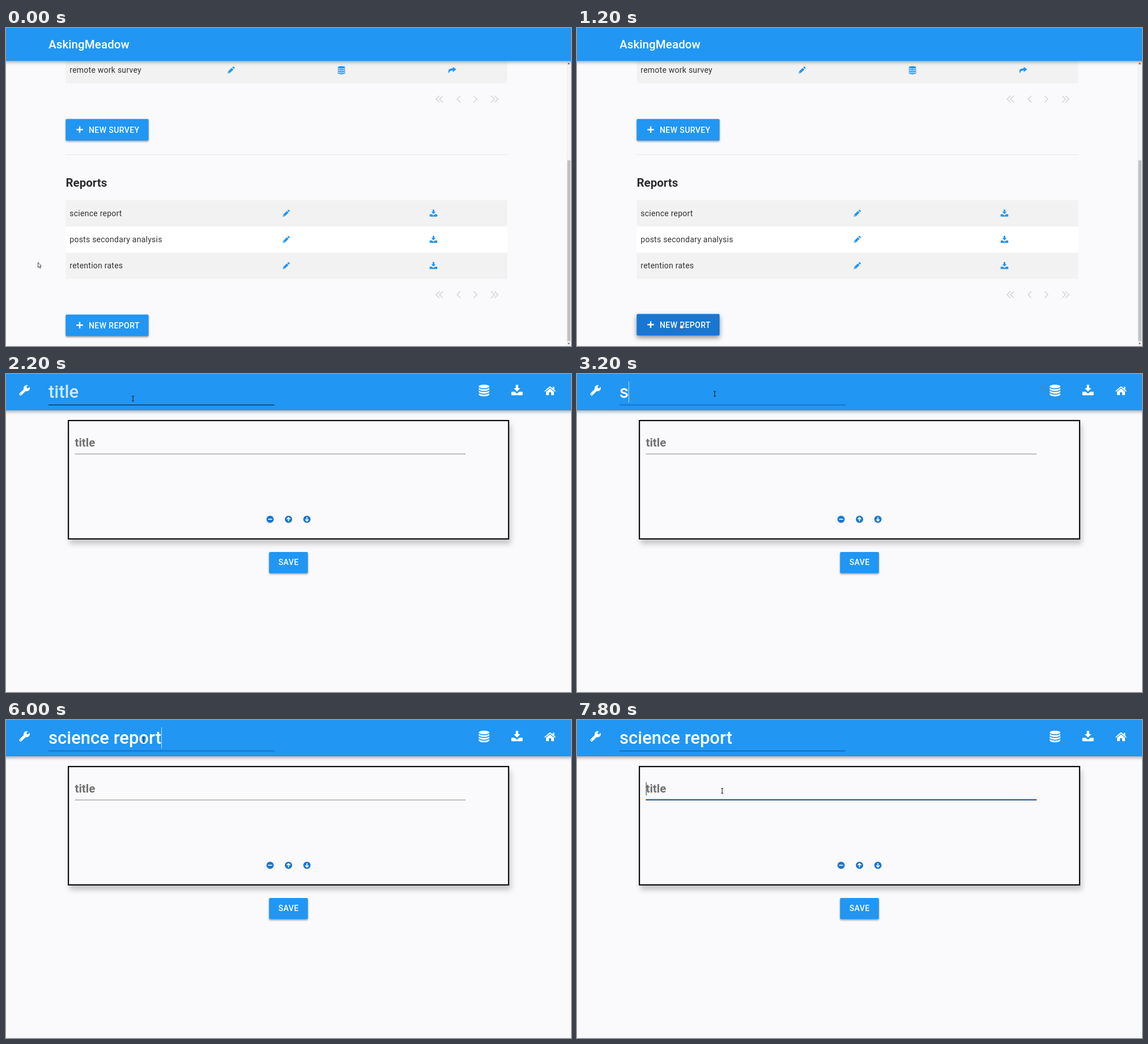
An HTML page for the animation above (8000 ms loop, 997x561 px).

```html
<!DOCTYPE html>
<html lang="en">
<head>
<meta charset="utf-8">
<title>Report builder</title>
<style>
html, body { margin: 0; width: 100%; height: 100%; overflow: hidden; background: #faf9fc; }
svg { display: block; width: 100vw; height: 100vh; }
text { font-family: Roboto, sans-serif; white-space: pre; }
.row { font-size: 14px; letter-spacing: .25px; fill: #333; }
.btn { font-size: 14px; font-weight: 500; letter-spacing: .4px; fill: #fff; }
.head { font-size: 20.5px; font-weight: 700; }
.field { font-size: 31px; font-weight: 500; }
.bar { fill: #2196f3; filter: drop-shadow(0 2px 3px rgba(0,0,0,.38)); }
.raised { filter: drop-shadow(0 2px 1.5px rgba(0,0,0,.36)); }
.lifted { filter: drop-shadow(0 4px 4px rgba(0,0,0,.42)); }
.card { fill: #faf9fc; stroke: #0b0b0f; stroke-width: 2.2; filter: drop-shadow(3px 8px 5px rgba(0,0,0,.2)); }
</style>
</head>
<body>
<svg id="stage" viewBox="0 0 997 561" preserveAspectRatio="none"></svg>
<script>
const LOOP = 8000, STEP = 200;
const BLUE = '#2196f3', DEEP = '#1976d2';
const stage = document.getElementById('stage');
const $ = id => document.getElementById(id);

// Icons live in a 16 x 16 box
const band = y => `M1 ${y}q2 2 7 2t7-2v2q-2 2.2-7 2.2t-7-2.2z`;
const ICONS = {
  pencil: '<path fill-rule="evenodd" d="M1 15l1-4.5 7.6-7.6 3.5 3.5L5.5 14zM3.1 11.3l-.7 2.3 2.3-.7zM10.6 1.9L12 .6a1.2 1.2 0 0 1 1.7 0l1.7 1.7a1.2 1.2 0 0 1 0 1.7l-1.3 1.4z"/>',
  data: `<ellipse cx="8" cy="2.6" rx="7" ry="2.4"/><path d="${[4.2, 7.8, 11.4].map(band).join('')}"/>`,
  share: '<path d="M9.5 1.5L16 6.5 9.5 11.5V8.6C5 8.6 3 10 2.5 14 0 10 .5 4.5 9.5 4.5z"/>',
  load: '<path d="M6.3.6h3.4v4.7h3L8 10.2 3.3 5.3h3zM1 10.4h3.6L8 13l3.4-2.6H15q1 0 1 1v3q0 1-1 1H1q-1 0-1-1v-3q0-1 1-1z"/>',
  home: '<path d="M0 8.4l8-6.8 3.8 3.2V2.4H14v4.3l2 1.7-.9 1L8 3.5.9 9.4zM2.4 9.4L8 4.8l5.6 4.6v4.8h-4v-4H6.4v4h-4z"/>',
  wrench: `<path d="M2.6 13.4L9 7" stroke="#fff" stroke-width="4" stroke-linecap="round"/><circle cx="11.3" cy="4.7" r="4.5"/>
    <path d="M11.8 4.2L16.5-.5" stroke="${BLUE}" stroke-width="3"/><circle cx="2.7" cy="13.3" r=".8" fill="${BLUE}"/>`,
  plus: '<path d="M6.3 0h3.4v6.3H16v3.4H9.7V16H6.3V9.7H0V6.3h6.3z"/>'
};
const icon = (name, x, y, size, fill = BLUE) =>
  `<g transform="translate(${x - size / 2} ${y - size / 2}) scale(${size / 16})" fill="${fill}">${ICONS[name]}</g>`;
const rect = (x, y, w, h, fill, more = '') => `<rect x="${x}" y="${y}" width="${w}" height="${h}" fill="${fill}" ${more}/>`;
const text = (s, x, y, cls, more = '') => `<text x="${x}" y="${y}" class="${cls}" ${more}>${s}</text>`;

const pager = y => {
  const left = x => `M${x + 3} ${y - 6}l-6 6 6 6`, right = x => `M${x - 3} ${y - 6}l6 6-6 6`;
  return `<path d="${left(762)}${left(768)}${left(799)}${right(828)}${right(859)}${right(865)}" fill="none" stroke="#d6d5d8" stroke-width="1.7"/>`;
};
const addButton = (label, y, id) =>
  `<g id="${id}">${rect(105.3, y, 146.3, 38, BLUE, `id="${id}Face" rx="2" class="raised"`)}
  ${icon('plus', 130, y + 18.7, 11.5, '#fff')}${text(label, 146, y + 24, 'btn')}</g>`;
const reportRow = (label, y, fill) =>
  rect(105.5, y, 779, 46, fill) + text(label, 112.3, y + 27.5, 'row') +
  icon('pencil', 494.3, y + 23, 13.5) + icon('load', 754.3, y + 22.5, 13.5);

const listView = `<g id="list">
  ${rect(105.5, 50, 779, 47.5, '#f2f2f2')}${text('remote work survey', 112.3, 79, 'row')}
  ${icon('pencil', 397, 74.5, 13.5)}${icon('data', 592, 74.5, 15)}${icon('share', 787, 74.5, 15)}
  ${pager(125.5)}${addButton('NEW SURVEY', 160.5, 'survey')}
  ${rect(105.5, 223, 779, 1, '#e6e5e8')}${text('Reports', 105.5, 279.5, 'head', 'fill="#2b2b2b"')}
  ${reportRow('science report', 304, '#f2f2f2')}${reportRow('posts secondary analysis', 350.3, '#fff')}${reportRow('retention rates', 396.5, '#f2f2f2')}
  ${pager(470.5)}${addButton('NEW REPORT', 505.5, 'report')}
  ${rect(989, 58, 8, 503, '#f3f2f4')}${rect(990.5, 233.5, 5.5, 319, '#c1c1c1')}
  <path d="M991 64l2-3 2 3zM991 555.5h4l-2 3z" fill="#666"/>
  ${rect(-10, -10, 1017, 68, BLUE, 'class="bar"')}
  ${text('AskingMeadow', 75, 36, '', 'font-size="20.5" font-weight="500" letter-spacing=".1" fill="#fff"')}
</g>`;

const disc = (x, mark) => `<circle cx="${x}" cy="256.3" r="6.4" fill="${DEEP}"/>
  <path d="M${x} 256.3${mark}" fill="none" stroke="#fff" stroke-width="1.7"/>`;
const editView = `<g id="edit">
  ${rect(-10, -10, 1017, 74, BLUE, 'class="bar"')}
  ${icon('wrench', 32.5, 29, 19.5, '#fff')}${icon('data', 843.5, 29.3, 21.5, '#fff')}${icon('load', 901.7, 28.3, 20, '#fff')}${icon('home', 960, 29.5, 20, '#fff')}
  ${text('', 75, 42, 'field', 'id="name"')}
  ${rect(75, 54, 398.5, 1.2, '#000', 'id="nameLine"')}${rect(75, 53.5, 0, 2, DEEP, 'id="nameFocus"')}
  ${rect(0, 13, 1, 37.5, '#b9dffc', 'id="nameCaret"')}
  <rect x="110.1" y="82.1" width="776.8" height="208.8" class="card"/>
  ${text('title', 121.5, 127.5, 'head', 'fill="#727272"')}
  ${rect(121.5, 140.5, 689.5, 1.2, '#000', 'id="cardLine"')}${rect(121.5, 139.6, 0, 2, '#1565c0', 'id="cardFocus"')}
  ${rect(121.6, 109.5, 1, 23.5, '#333', 'id="cardCaret"')}
  ${disc(466, 'm-3.5 0h7')}${disc(498.5, 'm0 3.8v-7m-3 3l3-3 3 3')}${disc(531, 'm0-3.8v7m-3-3l3 3 3-3')}
  ${rect(464.2, 314, 68.5, 37.3, BLUE, 'rx="2" class="raised"')}${text('SAVE', 480.7, 337.2, 'btn')}
</g>`;

const pointers = `<g id="pointer">
  <path id="arrow" d="M0 0v9l2-1.8 1.4 3.1 1.5-.7-1.4-3H6z" fill="#fff" stroke="#333" stroke-width=".9"/>
  <path id="hand" d="M0 .6q1-1 1.8 0v3l3 .7q1 .4.9 1.7L5 9.5H1L-1.8 6q0-1 1.8 0z" fill="#fff" stroke="#333" stroke-width=".7"/>
  <path id="beam" d="M-2-4.2h1.4L0-3.6l.6-.6H2M0-3.6v7.2M-2 4.2h1.4L0 3.6l.6.6H2" fill="none" stroke="#222" stroke-width="1.1"/>
</g>`;
stage.innerHTML = rect(0, 0, 997, 561, '#faf9fc') + listView + editView + pointers;

// [step, x, y] stops of the pointer
const PATH = [[0, 56.5, 413.5], [3, 115, 468], [5, 178, 517], [6, 182, 521], [8, 182, 521],
  [10, 215, 140], [11, 224, 43.5], [12, 243, 35], [32, 243, 35], [35, 256.5, 114.5], [38, 256.2, 125]];
// [step, value of the name field]
const TYPED = [[0, 'title'], [16, 's'], [17, 'sc'], [18, 'sci'], [19, 'scin'], [20, 'scinc'], [21, 'scince'],
  [22, 'sci'], [23, 'scien'], [24, 'science '], [27, 'science r'], [28, 'science rep'], [29, 'science repo'], [30, 'science report']];

function pointerAt(n) {
  const i = PATH.findIndex(p => p[0] > n);
  if (i < 0) return PATH[PATH.length - 1].slice(1);
  const [a, ax, ay] = PATH[i - 1], [b, bx, by] = PATH[i];
  const k = (n - a) / (b - a);
  return [ax + (bx - ax) * k, ay + (by - ay) * k];
}
const show = (id, on) => $(id).setAttribute('visibility', on ? 'inherit' : 'hidden');
const set = (id, attrs) => { for (const key in attrs) $(id).setAttribute(key, attrs[key]); };

// A focus line grows out of the clicked spot
function ripple(id, x, w, from, k) {
  set(id, { x: x + (from - x) * (1 - k), width: w * k });
}

function draw(time) {
  const n = Math.floor((time % LOOP) / STEP);
  const editing = n >= 7, over = n >= 5 && !editing;
  show('list', !editing);
  show('edit', editing);

  set('report', { transform: `translate(0 ${over ? -1 : 0})` });
  set('reportFace', { fill: over ? DEEP : BLUE, class: over ? 'lifted' : 'raised' });

  const value = TYPED.filter(e => e[0] <= n).pop()[1];
  $('name').textContent = value;
  set('name', { fill: n < 16 ? '#d0e8fc' : '#fff' });
  const end = n < 16 ? 0 : $('name').getComputedTextLength();
  set('nameCaret', { x: 75 + end });
  show('nameCaret', editing && n >= 14 && n < 31);

  const [x, y] = pointerAt(n);
  set('nameLine', { 'fill-opacity': n >= 11 && n < 14 ? .75 : .42 });
  ripple('nameFocus', 75, 398.5, 243, n < 13 || n > 38 ? 0 : n === 13 ? .6 : 1);
  const overCard = y > 95 && y < 145;
  set('cardLine', { 'fill-opacity': overCard ? .8 : .4 });
  ripple('cardFocus', 121.5, 689.5, 256, n < 38 ? 0 : n === 38 ? .6 : 1);
  show('cardCaret', n === 39);

  const beam = editing && (y < 60 || overCard);
  set('pointer', { transform: `translate(${x} ${y})` });
  show('hand', over);
  show('beam', beam);
  show('arrow', !over && !beam);
}

const start = performance.now();
(function tick() {
  draw(performance.now() - start);
  requestAnimationFrame(tick);
})();
</script>
</body>
</html>
```
